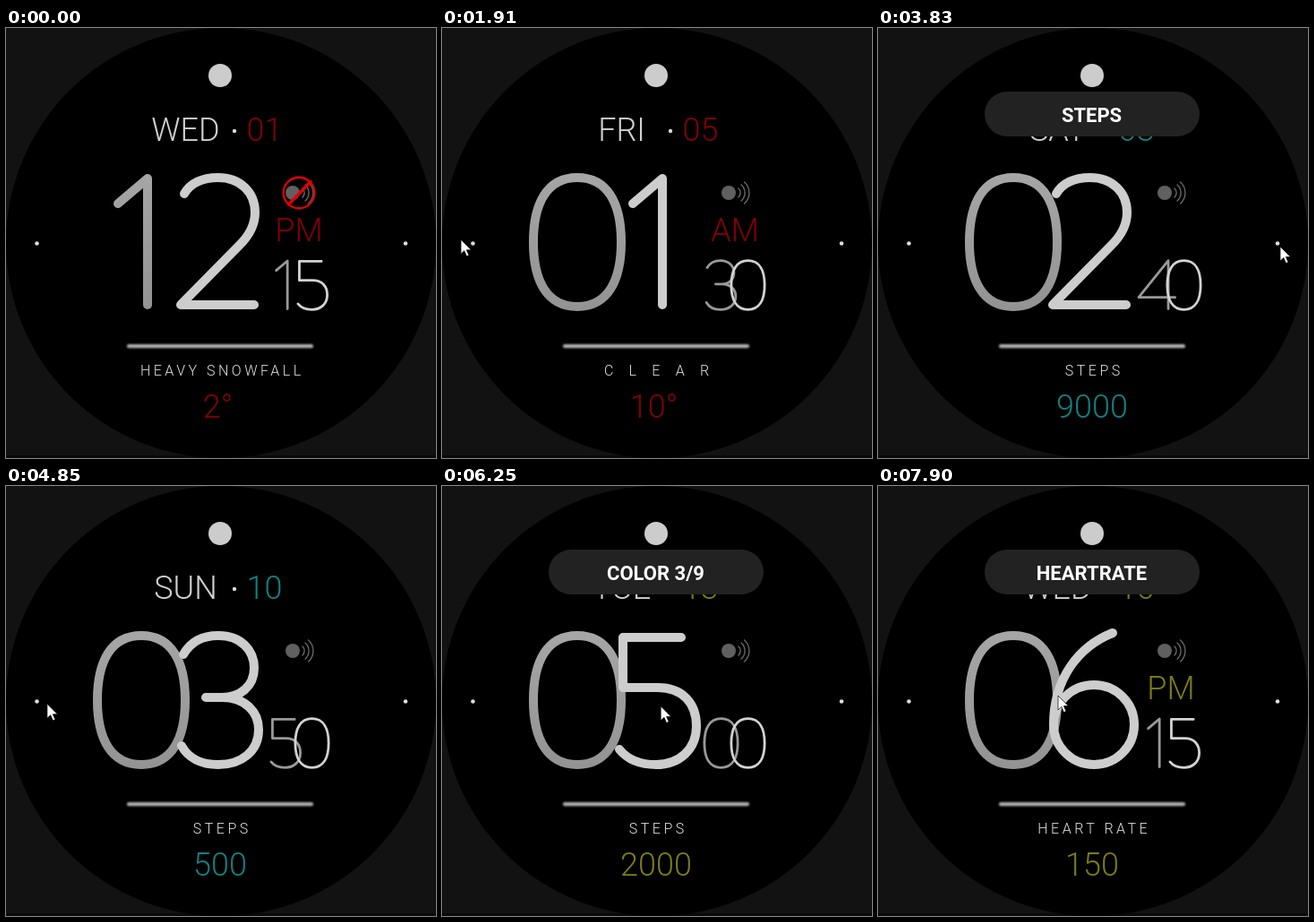
An HTML page for the animation above (7990 ms loop, 480 by 480 pixels).

```html
<!DOCTYPE html>
<html lang="en">
<head>
<meta charset="utf-8">
<title>Watch face preview</title>
<style>
  html, body { margin: 0; width: 100%; height: 100%; overflow: hidden; background: #121212; }
  svg { display: block; width: 100vw; height: 100vh; }
  text { font-family: Roboto, sans-serif; font-weight: 300; font-size: 36px; fill: #d0d0d0; }
  .mid { text-anchor: middle; }
  .accent { fill: var(--accent); }
  .line { fill: none; stroke-linecap: round; stroke-linejoin: round; }
  #label { font-size: 16px; fill: #e2e2e2; }
  #toast text { font-size: 22px; font-weight: 700; fill: #fff; }
</style>
</head>
<body>
<svg viewBox="0 0 480 480">
  <defs>
    <filter id="soft" x="-5%" y="-200%" width="110%" height="500%"><feGaussianBlur stdDeviation="1"/></filter>
    <linearGradient id="dim" gradientUnits="userSpaceOnUse" x1="0" y1="162" x2="0" y2="316">
      <stop offset="0" stop-color="#a6a6a6"/><stop offset="1" stop-color="#939393"/>
    </linearGradient>
  </defs>
  <rect width="480" height="480" fill="#121212"/>
  <rect y="477" width="480" height="3" fill="#0c080b"/>
  <circle cx="240" cy="240" r="240"/>
  <circle cx="239" cy="53" r="13" fill="#ccc"/>

  <text id="weekday" class="mid" x="200.5" y="126"></text>
  <circle cx="255" cy="115" r="2.2" fill="#d8d8d8"/>
  <text id="day" class="accent" x="268.5" y="126"></text>

  <g class="line" stroke-width="10">
    <path id="h0" transform="translate(151)" stroke="url(#dim)"/>
    <path id="h1" transform="translate(239)" stroke="#cdcdcd"/>
  </g>
  <g class="line" stroke-width="7.4">
    <path id="m0" transform="translate(311.5 287) scale(.38) translate(0 -239)" stroke="#999"/>
    <path id="m1" transform="translate(341.5 287) scale(.38) translate(0 -239)" stroke="#d2d2d2"/>
  </g>

  <circle cx="320" cy="184" r="8" fill="#606060"/>
  <path class="line" stroke="#666" stroke-width="1.4"
    d="M331 179a7 7 0 0 1 0 10M334 175a12 12 0 0 1 0 18M337.5 172a16 16 0 0 1 0 24"/>
  <g id="off" class="line" stroke="#e00008" stroke-width="2.4">
    <circle cx="327" cy="184" r="17.3"/>
    <path d="M315.5 197L340 171.5" stroke-width="3.4"/>
  </g>
  <text id="ampm" class="mid accent" x="327" y="238"></text>

  <rect x="135" y="353" width="208" height="4.2" rx="2" fill="#b0b0b0" filter="url(#soft)"/>
  <text id="label" class="mid" y="388"></text>
  <text id="value" class="mid accent" y="435"></text>

  <circle cx="34.5" cy="240.5" r="2.3" fill="#ddd"/>
  <circle cx="446" cy="240.5" r="2.3" fill="#ddd"/>

  <g id="toast">
    <rect x="119" y="71" width="240" height="50" rx="25" fill="#222"/>
    <text id="message" class="mid" x="238.5" y="105"></text>
  </g>
  <path id="cursor" d="M0 0V16L3.8 12.5L6.4 18.6L9 17.5L6.4 11.6H11.5Z" fill="#fff" stroke="#000" stroke-width=".7"/>
</svg>
<script>
const LOOP = 7990, START = 190, FRAME = 101.33, STEP = 542.8;
const el = Object.fromEntries([...document.querySelectorAll('[id]')].map(e => [e.id, e]));

// Centre lines of the digits, drawn around x = 0
const GLYPHS = {
  0: 'M0 167C34 167 49 196 49 239S34 311 0 311S-49 282 -49 239S-34 167 0 167Z',
  1: 'M-26 196L7 168V309',
  2: 'M-40 185C-33 173 -20 167 -2 167C22 167 39 183 39 206C39 221 32 232 22 242L-44 309H38',
  3: 'M-41 188C-33 174 -20 167 -2 167C24 167 38 184 38 203C38 224 22 236 2 236H-16M2 236C28 236 43 252 43 272C43 296 24 311 -2 311C-22 311 -36 303 -43 290',
  4: 'M33 309V167L-54 275H53',
  5: 'M28 169H-37V225H2C30 225 45 243 45 268C45 294 26 311 0 311C-20 311 -33 304 -41 294',
  6: 'M23 164C-15 179 -43 215 -43 266.5A45 44.5 0 1 0 47 266.5A45 44.5 0 1 0 -43 266.5'
};
const WEEK = ['WED', 'THU', 'FRI', 'SAT', 'SUN', 'MON', 'TUE'];
const WEATHER = [['HEAVY SNOWFALL', 2], ['SNOW', -4], ['RAIN', -6], ['SLEET', -8],
                 ['CLEAR', 10], ['HAZE', 12], ['HEAVY SNOWFALL', 14]];
const STEPS = [9000, 9500, 500, 1000, 1500, 2000, 2500];

// Each list: [start time, value...]
const MINUTES = [[0, '15'], [190, '20'], [1700, '30'], [3200, '40'], [4690, '50'], [5550, '00'], [6220, '05'], [7780, '15']];
const COLORS = [[0, '#800006'], [2000, '#108080'], [5550, '#7c7c18']];
const TOASTS = [[0, ''], [2000, 'COLOR 2/9'], [3420, 'STEPS'], [4700, ''], [5550, 'COLOR 3/9'], [6450, ''], [7250, 'HEARTRATE']];
const PATH = [[590, 423, 250], [800, 300, 246], [1210, 11, 230], [1305, 16, 229], [1800, 16, 234], [2110, 30, 240],
              [2310, 30, 240], [2723, 420, 228], [2824, 457, 225], [2925, 468, 232], [3030, 455, 240], [3230, 446, 244],
              [3530, 445, 244], [3838, 449, 244], [3940, 461, 246], [4150, 430, 250], [4550, 122, 250], [4750, 50, 244],
              [5150, 34, 241], [5850, 34, 241], [6450, 430, 250], [6570, 449, 248], [6979, 447, 246], [7200, 451, 246],
              [7370, 447, 247], [7690, 447, 247], [7790, 330, 241], [7885, 201, 234]];

const at = (list, t) => list.findLast(item => item[0] <= t)[1];

function pointer(t) {
  const i = PATH.findIndex(p => p[0] > t);
  if (i < 0) return PATH.at(-1).slice(1);
  const [a, b] = [PATH[i - 1], PATH[i]];
  const f = (t - a[0]) / (b[0] - a[0]);
  return [a[1] + (b[1] - a[1]) * f, a[2] + (b[2] - a[2]) * f];
}

function reading(k) {
  if (k < 6) {
    const [name, degrees] = WEATHER[k + 1];
    return [name, degrees + '°'];
  }
  return k < 13 ? ['STEPS', STEPS[k - 6]] : ['HEART RATE', 140 + (k - 13) * 10];
}

function setDigits(prefix, digits) {
  [...digits].forEach((d, i) => el[prefix + i].setAttribute('d', GLYPHS[d]));
}

function draw(time) {
  const n = Math.min(76, Math.floor((time - 174) / FRAME));
  const t = Math.max(0, START + n * FRAME);
  const k = Math.max(-1, Math.floor((t - START) / STEP));
  const hour = Math.floor((k + 1) / 2);

  el.weekday.textContent = WEEK[hour % 7];
  el.day.textContent = String(k + 2).padStart(2, '0');
  setDigits('h', hour ? '0' + (hour - 1) : '12');
  setDigits('m', at(MINUTES, t));
  el.ampm.textContent = k < 3 || k > 12 ? 'PM' : k < 6 ? 'AM' : '';
  el.off.style.display = k === -1 || k === 9 ? '' : 'none';

  const [name, value] = reading(k);
  const spacing = k < 6 && name.length < 6 ? (117 - 9.6 * name.length) / (name.length - 1) : 3.5;
  el.label.textContent = name;
  el.label.style.letterSpacing = spacing + 'px';
  el.label.setAttribute('x', 239.5 + spacing / 2);
  el.value.textContent = value;
  el.value.setAttribute('x', k < 6 ? 236.5 : 239);

  const message = at(TOASTS, t);
  el.toast.style.display = message ? '' : 'none';
  el.message.textContent = message;
  document.documentElement.style.setProperty('--accent', at(COLORS, t));

  const shown = t >= PATH[0][0];
  el.cursor.style.display = shown ? '' : 'none';
  if (shown) el.cursor.setAttribute('transform', `translate(${pointer(t)})`);
}

const origin = performance.now();
function tick() {
  draw((performance.now() - origin) % LOOP);
  requestAnimationFrame(tick);
}
tick();
</script>
</body>
</html>
```
